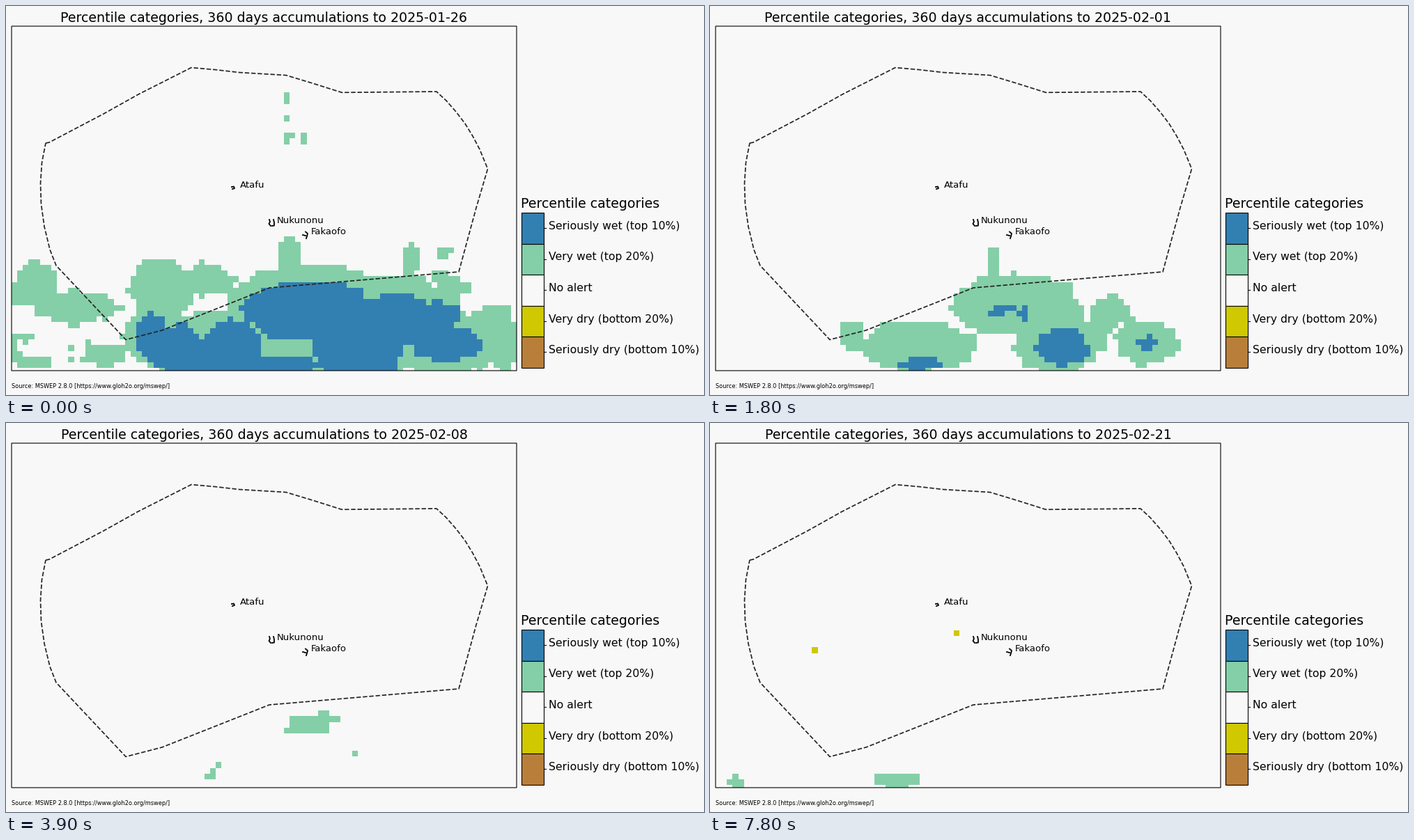
A matplotlib script that plays this animation: 1002x559 px, repeating every 8 s.

```python
import numpy as np
import matplotlib.pyplot as plt
from matplotlib.animation import FuncAnimation
from matplotlib.patches import Rectangle

W, H, DPI = 1002, 559, 100
STEP, INTERVAL, LOOP = 300, 100, 8000
LEFT, TOP, RIGHT, BOTTOM = 8, 29, 733, 524
COLS, ROWS, GRID_TOP, CELL_H = 89, 61, 25.5, 8.25
CELL_W = (RIGHT - LEFT) / COLS
BG = "#f8f8f8"
BLUE, GREEN, YELLOW, BROWN = "#327fb2", "#84cfa7", "#d0c800", "#b87f3b"
START, LAST_DAY = np.datetime64("2025-01-26"), 26

# Elliptic areas: centre x, y, radii, and the days until the centre dries
VERY_WET = [
    (40, 400, 36, 32, 2.3), (100, 435, 62, 25, 2.6), (18, 482, 22, 14, 1),
    (38, 512, 28, 10, 2.3), (145, 500, 40, 16, 1), (225, 410, 45, 46, 4),
    (285, 394, 46, 21, 2.6), (205, 475, 38, 38, 8.5), (300, 490, 110, 50, 13),
    (290, 508, 16, 14, 16.5), (407, 374, 18, 45, 8), (440, 430, 125, 58, 14.5),
    (500, 485, 95, 60, 12.5), (570, 440, 72, 52, 8), (625, 485, 70, 50, 10.5),
    (630, 405, 28, 20, 1.5), (700, 480, 52, 48, 3.5), (582, 366, 13, 24, 3),
    (626, 354, 15, 9, 2.5)]
NORTH = [(403, 131, 6, 9, 3), (403, 161, 5, 5, 1.5), (403, 190, 5, 9, 3.5),
         (411, 186, 5, 5, 3.5), (428, 189, 5, 9, 3)]
SERIOUSLY_WET = [
    (440, 440, 106, 43, 6.3), (505, 490, 66, 52, 8.5), (548, 442, 75, 30, 3.5),
    (600, 455, 50, 36, 4), (630, 485, 50, 28, 6.2), (210, 476, 20, 36, 3.2),
    (250, 492, 55, 28, 2.2), (325, 485, 44, 34, 4), (300, 515, 80, 22, 7),
    (400, 515, 55, 14, 2.4)]
RETURNING = [(268, 514, 34, 13, 4), (38, 517, 13, 9, 3)]
DRY = [(354, 302, 18), (151, 327, 25)]  # x, y, first day

cx, cy = np.meshgrid(LEFT + CELL_W * (np.arange(COLS) + 0.5),
                     GRID_TOP + CELL_H * (np.arange(ROWS) + 0.5))


def days_left(areas):
    """Days each cell stays wet: longest in the middle, none at the rim."""
    return np.max([life * (1 - ((cx - x) / rx) ** 2 - ((cy - y) / ry) ** 2)
                   for x, y, rx, ry, life in areas], axis=0)


noise = np.random.default_rng(7).normal(0, 0.4, (ROWS, COLS))
noise += 0.7 * (np.roll(noise, 1, axis=0) + np.roll(noise, 1, axis=1))
wet = days_left(VERY_WET + NORTH) + noise
soaked = days_left(SERIOUSLY_WET) + noise
returning = days_left(RETURNING)


def rgb(code):
    return [int(code[i:i + 2], 16) for i in (1, 3, 5)]


def picture(day):
    img = np.empty((ROWS, COLS, 3), np.uint8)
    img[:] = rgb(BG)
    img[(wet > day) | (returning > LAST_DAY - day)] = rgb(GREEN)
    img[soaked > day] = rgb(BLUE)
    for x, y, first in DRY:
        if day >= first:
            img[int((y - GRID_TOP) / CELL_H), int((x - LEFT) / CELL_W)] = rgb(YELLOW)
    return img


fig = plt.figure(figsize=(W / DPI, H / DPI), dpi=DPI, facecolor=BG)
ax = fig.add_axes([0, 0, 1, 1])
ax.axis("off")


def label(x, y, text, px, **kw):
    return ax.text(x, y, text, fontsize=px * 72 / DPI, family="DejaVu Sans",
                   color="black", va="baseline", **kw)


def frame(x, y, w, h, fill="none", **kw):
    ax.add_patch(Rectangle((x, y), w, h, fc=fill, ec="black", lw=0.8, zorder=4, **kw))


def line(*points, **kw):
    ax.plot(*zip(*points), **kw)


cells = ax.imshow(picture(0), interpolation="nearest", aspect="auto", zorder=1,
                  extent=(LEFT, RIGHT, GRID_TOP + ROWS * CELL_H, GRID_TOP))
cells.set_clip_path(Rectangle((LEFT, TOP), RIGHT - LEFT, BOTTOM - TOP,
                              transform=ax.transData))
ax.set(xlim=(0, W), ylim=(H, 0))
frame(LEFT, TOP, RIGHT - LEFT, BOTTOM - TOP, snap=False)

# Sea boundary and atolls
line((57, 197), (62, 196), (140, 155), (190, 127), (266, 88.5), (300, 91.5),
     (335, 95.5), (402, 99.5), (440, 111), (482, 124.3), (618, 123), (632, 136),
     (646, 152), (659, 169), (670, 187), (680, 206), (691.5, 234), (675, 290),
     (650, 382), (378, 405), (224, 466), (172, 479.5), (72, 373), (63, 350),
     (55, 317), (50.5, 285), (49.5, 255), (51.5, 225), (57, 197),
     color="#262626", lw=1.25, ls="--", zorder=3)
coast = dict(color="black", lw=1.3, zorder=3)
line((324, 260), (327, 259.5), (328, 262), (325, 263), **coast)
line((378, 307), (379, 310), (377.5, 313), (380, 316), **coast)
line((382, 316), (385, 315.5), (385, 311), (384, 307), **coast)
line((430, 324.5), (433, 327), (432, 331), (431, 334), **coast)
line((426, 329), (430, 330), **coast)
label(336, 261, "Atafu", 13.25)
label(389, 312, "Nukunonu", 13.25)
label(438, 328, "Fakaofo", 13.25)

# Legend
label(739, 289.5, "Percentile categories", 19)
legend = [(BLUE, "Seriously wet (top 10%)"), (GREEN, "Very wet (top 20%)"),
          (BG, "No alert"), (YELLOW, "Very dry (bottom 20%)"),
          (BROWN, "Seriously dry (bottom 10%)")]
for i, (color, text) in enumerate(legend):
    y = 297 + 44.5 * i
    frame(740, y, 32.5, 44.5, color)
    line((772.5, y + 22.2), (775, y + 22.2), color="black", lw=0.8)
    label(779.3, y + 24, text, 15.65)

label(8, 549, "Source: MSWEP 2.8.0 [https://www.gloh2o.org/mswep/]", 8.3)
title = label(370.5, 23, "", 19, ha="center")


def update(i):
    day = i * INTERVAL // STEP
    title.set_text(f"Percentile categories, 360 days accumulations to {START + day}")
    cells.set_data(picture(day))
    return cells, title


anim = FuncAnimation(fig, update, frames=LOOP // INTERVAL, interval=INTERVAL,
                     repeat=True, repeat_delay=0, blit=False)
plt.show()
```
